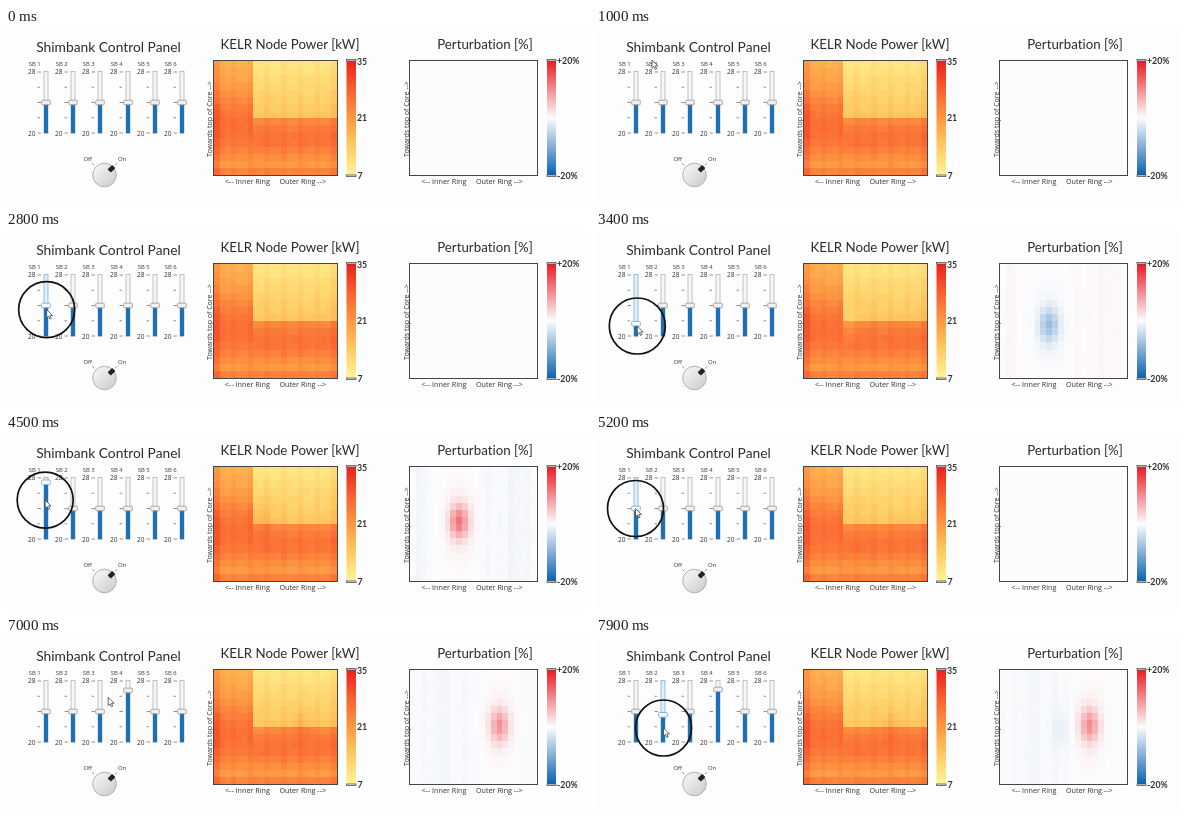
An HTML page with a canvas that plays this animation: 584x175 px, repeating every 8000 ms.

```html
<!DOCTYPE html>
<html lang="en">
<head>
<meta charset="utf-8">
<title>Shimbank Control Panel</title>
<style>
  html, body { margin: 0; width: 100%; height: 100%; overflow: hidden; background: #fdfdfe; }
  canvas, svg { position: absolute; left: 0; top: 0; width: 584px; height: 175px; }
  text { font-family: "Open Sans", "Noto Sans", sans-serif; fill: #333; }
  .title { font-family: Lato, sans-serif; font-size: 13.3px; font-variant-ligatures: none; fill: #2b2b2b; text-anchor: middle; }
  .axis { font-size: 7.2px; }
  .small { font-size: 5.9px; }
  .scale { font-size: 6.5px; }
  .bar { font-family: Lato, sans-serif; font-size: 8.8px; font-weight: 700; }
  .frame { fill: none; stroke: #444; }
  .cap { fill: #eee; stroke: #555; stroke-width: .8; }
  .tick { stroke: #777; stroke-width: .8; }
  .track { fill: #f7f7f7; stroke: #b4b4b4; stroke-width: .8; }
  .hover .track { fill: #e3eff8; stroke: #7fb2d6; }
  .level { fill: #1c70b5; }
  .thumb { fill: #f0f0f0; stroke: #9a9a9a; stroke-width: .8; }
  .hover .thumb { fill: #fff; stroke: #6fa6cc; }
</style>
</head>
<body>
<canvas id="maps" width="584" height="175"></canvas>
<svg viewBox="0 0 584 175">
  <defs>
    <linearGradient id="heat" x2="0" y1="1" y2="0"/>
    <linearGradient id="diff" x2="0" y1="1" y2="0"/>
    <linearGradient id="metal" x2="1" y2="1">
      <stop offset="0" stop-color="#fafafa"/>
      <stop offset="1" stop-color="#cacaca"/>
    </linearGradient>
  </defs>

  <text class="title" x="102.500" y="24" style="font-size:13.8px">Shimbank Control Panel</text>
  <text class="title" x="284" y="21">KELR Node Power [kW]</text>
  <text class="title" x="479" y="21">Perturbation [%]</text>

  <g id="sliders"></g>

  <g id="knob">
    <path class="tick" d="M88.300 137.300l-2-2M109 137.300l2-2"/>
    <text class="small" x="77.500" y="133.300">Off</text>
    <text class="small" x="112" y="133.300">On</text>
    <circle cx="98.500" cy="147" r="11.800" fill="url(#metal)" stroke="#aaa" stroke-width=".9"/>
    <rect x="-3.200" y="-2.300" width="6.400" height="4.600" rx=".8" fill="#222" transform="translate(105.500 140.700) rotate(-45)"/>
  </g>

  <g id="labels"></g>
  <rect class="frame" x="207.500" y="32.500" width="124" height="115"/>
  <rect class="frame" x="403.500" y="32.500" width="128" height="115"/>

  <rect x="340.500" y="33" width="9.500" height="114" fill="url(#heat)"/>
  <rect class="cap" x="340.500" y="31.500" width="9.500" height="1.500"/>
  <rect class="cap" x="340.500" y="147" width="9.500" height="1.500"/>
  <text class="bar" x="351" y="36.500">35</text>
  <text class="bar" x="351" y="93">21</text>
  <text class="bar" x="351.500" y="150.500">7</text>

  <rect x="541" y="33" width="9" height="114" fill="url(#diff)"/>
  <rect class="cap" x="541" y="31.500" width="9" height="1.500"/>
  <rect class="cap" x="541" y="147" width="9" height="1.500"/>
  <text class="bar" x="551" y="35.500">+20%</text>
  <text class="bar" x="551" y="151">-20%</text>

  <g id="pointer">
    <circle id="ring" r="28" fill="none" stroke="#111" stroke-width="1.700"/>
    <path d="M0 0v8.200l1.900-1.700 1.300 2.900 1.400-.6-1.300-2.900h2.600z" fill="#fff" stroke="#444" stroke-width=".8"/>
  </g>
</svg>
<script>
const LOOP = 8000, COLS = 22, ROWS = 16, REST = 74.5, BOTTOM = 105, LAG = 250;
const $ = id => document.getElementById(id);
const ctx = $("maps").getContext("2d");
const clamp = (v, a, b) => Math.min(b, Math.max(a, v));
const smooth = k => k * k * (3 - 2 * k);
const bell = (d, s) => Math.exp(-d * d / (2 * s * s));
const noise = (a, b) => (Math.abs(Math.sin(a * 12.99 + b * 78.23) * 43758.5) % 1) - .5;

// Pointer moves, each eased from where the last one ended
const moves = [
  { at: 500, dur: 500, x: 56, y: 32 },
  { at: 1000, dur: 700, x: 40.5, y: REST },
  { at: 2600, dur: 700, x: 41.3, y: 95 },
  { at: 3550, dur: 530, x: 38.5, y: 48 },
  { at: 4220, dur: 450, x: 39.5, y: REST },
  { at: 5380, dur: 620, x: 121.5, y: REST },
  { at: 6400, dur: 400, x: 121.5, y: 52.5 },
  { at: 6900, dur: 250, x: 67.5, y: REST },
  { at: 7550, dur: 350, x: 67.5, y: 91 }
];
const presses = [
  { slider: 0, from: 2600, to: 5350 },
  { slider: 3, from: 6350, to: 6900 },
  { slider: 1, from: 7180, to: LOOP }
];

function pointerAt(t) {
  let x = 66, y = 22;
  for (const m of moves) {
    const k = smooth(clamp((t - m.at) / m.dur, 0, 1));
    x += (m.x - x) * k;
    y += (m.y - y) * k;
  }
  return [x, y];
}

// A slider follows the pressed pointer a little late
function sliderAt(n, t) {
  const p = presses.find(p => p.slider === n);
  return p && t - LAG > p.from ? pointerAt(Math.min(t - LAG, p.to))[1] : REST;
}

// Static parts
const trackX = n => Math.round(40 + 27.2 * n);
$("sliders").innerHTML = Array.from({ length: 6 }, (_, n) => {
  const x = trackX(n);
  const ticks = Array.from({ length: 5 }, (_, i) =>
    `<path class="tick" d="M${x - 8.5} ${44 + 15.25 * i}h${i % 2 ? 2.5 : 3.5}"/>`).join("");
  return `<g><text class="small" x="${x - 17.3}" y="37.800">SB ${n + 1}</text>
    <text class="scale" x="${x - 18}" y="46.400">28</text>
    <text class="scale" x="${x - 18}" y="107.600">20</text>${ticks}
    <rect class="track" x="${x - 2}" y="43.500" width="4" height="62"/>
    <rect class="level" x="${x - 2}" width="4"/>
    <rect class="thumb" x="${x - 4.3}" width="8.600" height="4.600" rx=".8"/></g>`;
}).join("");
$("labels").innerHTML = [208, 404.5].map(x =>
  `<text class="axis" x="${x + 11}" y="155.500">&lt;-- Inner Ring</text>
   <text class="axis" x="${x + 65.5}" y="155.500">Outer Ring --&gt;</text>
   <text class="axis" style="font-size:7px" transform="translate(${x - 2} 129) rotate(-90)">Towards top of Core --&gt;</text>`).join("");
const sliders = [...$("sliders").children].map(g => ({
  g, level: g.querySelector(".level"), thumb: g.querySelector(".thumb")
}));

// Colour scales, low to high
const heat = [[255, 244, 152], [254, 203, 98], [253, 152, 66], [250, 96, 48], [232, 34, 29]];
const diff = [[12, 98, 176], [252, 252, 253], [234, 28, 36]];
function fillGradient(id, stops) {
  $(id).innerHTML = stops.map((c, i) =>
    `<stop offset="${i / (stops.length - 1)}" stop-color="rgb(${c})"/>`).join("");
}
fillGradient("heat", heat);
fillGradient("diff", diff);

function colour(stops, v) {
  const p = clamp(v, 0, 1) * (stops.length - 1), i = Math.min(stops.length - 2, Math.floor(p));
  return `rgb(${stops[i].map((c, j) => Math.round(c + (stops[i + 1][j] - c) * (p - i)))})`;
}

function drawMap(x, y, w, h, stops, value) {
  const px = c => Math.round(x + c * w / COLS), py = r => Math.round(y + r * h / ROWS);
  for (let r = 0; r < ROWS; r++) for (let c = 0; c < COLS; c++) {
    ctx.fillStyle = colour(stops, value(c, r));
    ctx.fillRect(px(c), py(r), px(c + 1) - px(c), py(r + 1) - py(r));
  }
}

// Relative power: inner ring bulges mid-height, outer ring steps up below row 8
function power(c, r) {
  const inner = .36 + .33 * bell(r - 8.7, 4);
  const outer = r < 8 ? .1 + .025 * r : .44 + .23 * bell(r - 10.3, 2.2);
  const texture = .025 * Math.cos(c * Math.PI * 2 / 3) + .03 * noise(c, r);
  const edge = .1 * bell(c, .6) + .04 * bell(c - COLS + 1, .6) + .14 * bell(r - ROWS + 1, .3);
  return (c < 7 ? inner : outer) + texture + edge;
}

// Local peak at the moved slider's column, faint opposite sign far away
function perturb(c, r, ys) {
  return ys.reduce((sum, y, n) => {
    const lift = (REST - y) / 24;
    const dc = c - Math.round(8 + n * 7 / 3), dr = r - (7.7 - .5 * lift);
    const core = .5 * bell(dc, 1.1) * bell(dr, 1.65);
    const halo = .05 * bell(dc, 2.2) * bell(dr, 4);
    const far = .06 * (1 - bell(dc, 4)) * (.5 + noise(c, n) * .8 + noise(c, r) * .2);
    return sum + lift * (core + halo - far);
  }, 0);
}

function draw(t) {
  const ys = sliders.map((_, n) => sliderAt(n, t));
  const [x, y] = pointerAt(t);
  sliders.forEach(({ g, level, thumb }, n) => {
    g.setAttribute("class", t > 1500 && Math.abs(x - trackX(n)) < 5 ? "hover" : "");
    level.setAttribute("y", ys[n]);
    level.setAttribute("height", BOTTOM - ys[n]);
    thumb.setAttribute("y", ys[n] - 2.3);
  });
  drawMap(208, 33, 123, 114, heat, (c, r) => power(c, r) + .15 * perturb(c, r, ys));
  drawMap(404, 33, 127, 114, diff, (c, r) => .5 + .5 * perturb(c, r, ys));
  $("pointer").setAttribute("transform", `translate(${x} ${y})`);
  $("pointer").style.display = t < moves[0].at ? "none" : "";
  $("ring").style.display = presses.some(p => t >= p.from && t < p.to) ? "" : "none";
}

const start = performance.now();
function tick() {
  draw((performance.now() - start) % LOOP);
  requestAnimationFrame(tick);
}
tick();
</script>
</body>
</html>
```
